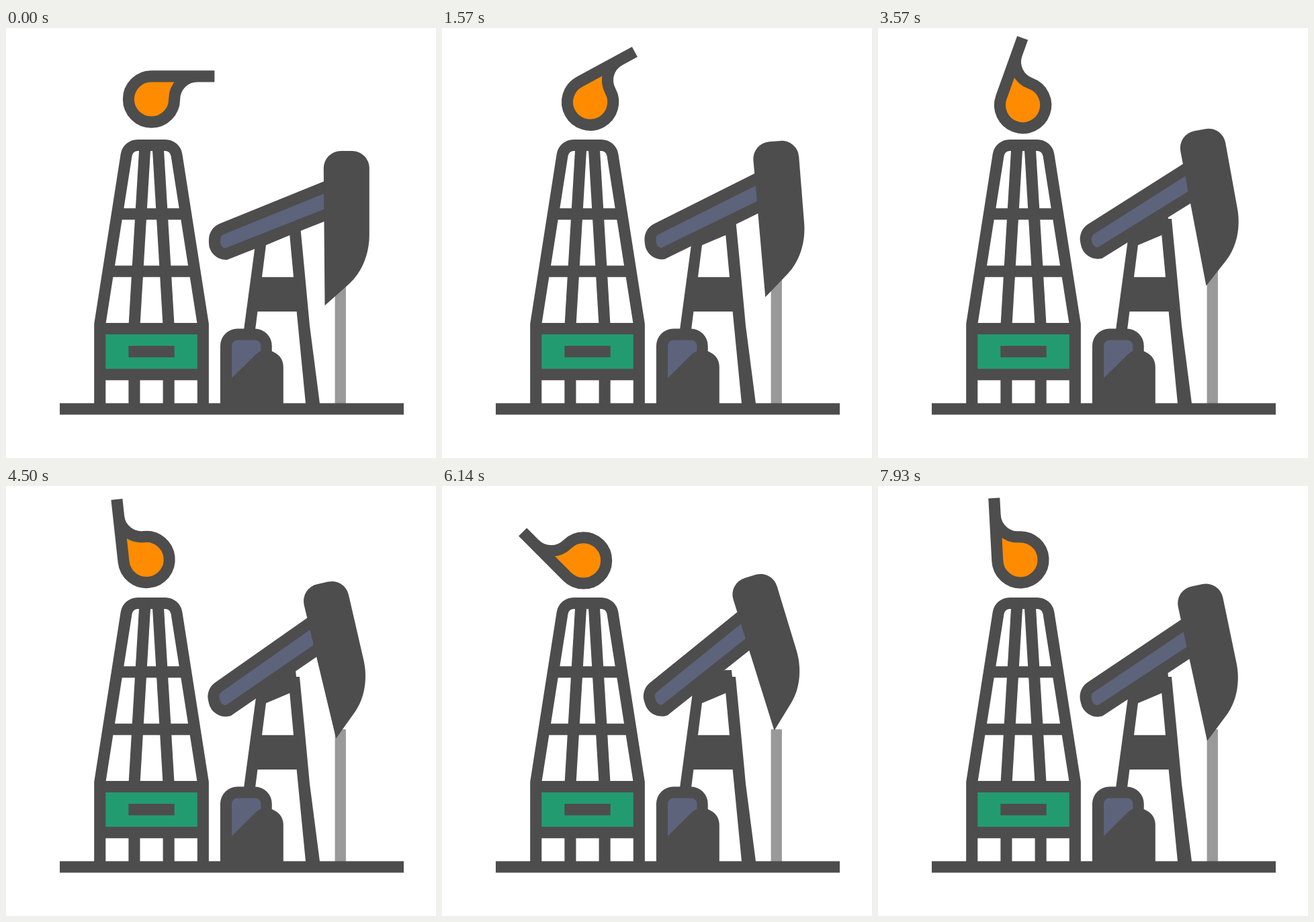
Recreate the animation shown at these times as an HTML page with a canvas. Size 640 px wide and 640 px high, loop 8 s.

```html
<!DOCTYPE html>
<html lang="en">
<head>
<meta charset="utf-8">
<title>Oil field</title>
<style>
  html, body { margin: 0; width: 100%; height: 100%; overflow: hidden; background: #fff; }
  canvas { display: block; width: 640px; height: 640px; }
</style>
</head>
<body>
<canvas id="stage" width="640" height="640"></canvas>
<script>
const ctx = document.getElementById('stage').getContext('2d');
const DARK = '#4d4d4d', BLUE = '#5c637b', GREEN = '#239b71', ORANGE = '#ff8c00', GREY = '#999999';
const LOOP = 8000, STEP = 1000 / 14;

// Icon grid: 60 x 60 units, two units per line weight
const U = 512 / 60, LINE = 2 * U, ROUND = 3 * U;
const gx = n => 80 + n * U, gy = n => 63.5 + n * U;

// Flame poses three seconds apart, joined by steady motion
const BEAT = 3000;
const poses = [
  { x: 186.5, y: 131, turn: 0 },
  { x: 224, y: 160.5, turn: 54.3 },
  { x: 250.3, y: 112.6, turn: 138.2 },
  { x: 231.9, y: 152.8, turn: 68 }
];
const flamePivot = { x: -30, y: 25 };
const beamPivot = { x: 319.5, y: 321 };

const mix = (a, b, k) => a + (b - a) * k;
const rad = deg => deg * Math.PI / 180;
const beamTilt = t => 17.3 * (1 - Math.abs(t / 6000 - 1));

function box(color, x1, y1, x2, y2) {
  ctx.fillStyle = color;
  ctx.fillRect(x1, y1, x2 - x1, y2 - y1);
}

function unitBox(color, x1, y1, x2, y2) {
  box(color, gx(x1), gy(y1), gx(x2), gy(y2));
}

function fill(color) {
  ctx.fillStyle = color;
  ctx.fill();
}

function outline() {
  ctx.strokeStyle = DARK;
  ctx.lineWidth = LINE;
  ctx.stroke();
}

function poly(color, ...pts) {
  ctx.beginPath();
  for (let i = 0; i < pts.length; i += 2) ctx.lineTo(pts[i], pts[i + 1]);
  ctx.closePath();
  fill(color);
}

// Draws with x measured from the pivot, turned anticlockwise
function turned(x, y, deg, paint) {
  ctx.save();
  ctx.translate(x, y);
  ctx.rotate(-rad(deg));
  paint();
  ctx.restore();
}

function derrickHalf() {
  unitBox(DARK, 12, 53, 14, 59);
  poly(DARK, 198.4, 176, 215.4, 176, gx(14), 444, gx(12), 444);
  ctx.beginPath();
  ctx.moveTo(gx(7), gy(59));
  ctx.lineTo(gx(7), 441);
  ctx.arcTo(181.4, gy(13), gx(16), gy(13), LINE);
  ctx.lineTo(gx(16) + 1, gy(13));
  outline();
}

function derrick() {
  unitBox(GREEN, 7, 45, 25, 53);
  unitBox(DARK, 12, 48, 20, 50);
  unitBox(DARK, 7, 44, 25, 46);
  unitBox(DARK, 7, 52, 25, 54);
  unitBox(DARK, 10.2, 24, 21.8, 26);
  unitBox(DARK, 8.7, 34, 23.3, 36);
  derrickHalf();
  ctx.save();
  ctx.translate(2 * gx(16), 0);
  ctx.scale(-1, 1);
  derrickHalf();
  ctx.restore();
}

function flame(t) {
  const i = Math.floor(t / BEAT), k = t / BEAT - i;
  const pose = key => mix(poses[i][key], poses[i + 1][key], k);
  const r = 2 * LINE;
  turned(pose('x'), pose('y'), pose('turn'), () => {
    ctx.translate(-flamePivot.x, -flamePivot.y);
    ctx.beginPath();
    ctx.moveTo(11 * U, -r);
    ctx.lineTo(0, -r);
    ctx.arc(0, 0, r, -Math.PI / 2, 0, true);
    ctx.arc(2 * r, 0, r, Math.PI, -Math.PI / 2);
    fill(ORANGE);
    outline();
  });
}

function pumpStand() {
  box(GREY, gx(48), gy(35), 505.9, 559);
  poly(DARK, 374, 300, 390, 300, 387, 323, 371, 449, 354, 449);
  poly(DARK, 372, 325, 387.5, 323, 423, 308, 437, 300, 437, 284, 432, 284, 431, 274, 421, 274, 380, 292);
  poly(DARK, 420, 284, 437, 284, 445, 368, 452, 443, 467, 559, 446, 559, 432.5, 421, 428, 371);
  poly(DARK, 366, gy(36), 440, gy(36), 442, gy(42), 362, gy(42));
}

function motor() {
  ctx.beginPath();
  ctx.moveTo(gx(28), gy(59));
  ctx.arcTo(gx(28), gy(45), gx(32), gy(45), ROUND);
  ctx.arcTo(gx(37), gy(45), gx(37), gy(49), ROUND);
  ctx.lineTo(gx(37), 481);
  ctx.quadraticCurveTo(gx(39), 488, gx(39), 505);
  ctx.lineTo(gx(39), gy(59));
  fill(DARK);

  ctx.beginPath();
  ctx.moveTo(gx(30), 521);
  ctx.arcTo(gx(30), gy(47), gx(32), gy(47), U);
  ctx.arcTo(379.5, gy(47), 379.5, 480, U);
  ctx.lineTo(379.5, 480.8);
  ctx.quadraticCurveTo(375, 482.5, 371, 486.5);
  ctx.closePath();
  fill(BLUE);
}

function beam(t) {
  turned(beamPivot.x, beamPivot.y, beamTilt(t), () => {
    ctx.translate(-beamPivot.x, -beamPivot.y);
    ctx.beginPath();
    ctx.moveTo(482, 233.9);
    ctx.arc(327.5, 315, LINE, rad(-112), Math.PI, true);
    ctx.arc(327.5, 319.4, LINE, Math.PI, Math.PI / 2, true);
    ctx.lineTo(482, 275.5);
    fill(BLUE);
    outline();

    ctx.beginPath();
    ctx.moveTo(474.5, 413);
    ctx.arcTo(gx(46), gy(14), gx(50), gy(14), ROUND);
    ctx.arcTo(gx(54), gy(14), gx(54), 308, ROUND);
    ctx.lineTo(gx(54), 308);
    ctx.bezierCurveTo(gx(54), 336, 530, 364, 510, 381.5);
    fill(DARK);
  });
}

function draw(t) {
  box('#fff', 0, 0, 640, 640);
  derrick();
  flame(t);
  pumpStand();
  beam(t);
  motor();
  unitBox(DARK, 0, 58, 60, 60);
}

const start = performance.now();
function tick() {
  const t = (performance.now() - start) % LOOP;
  draw(Math.floor((t + 5) / STEP) * STEP % LOOP);
  requestAnimationFrame(tick);
}
tick();
</script>
</body>
</html>
```
